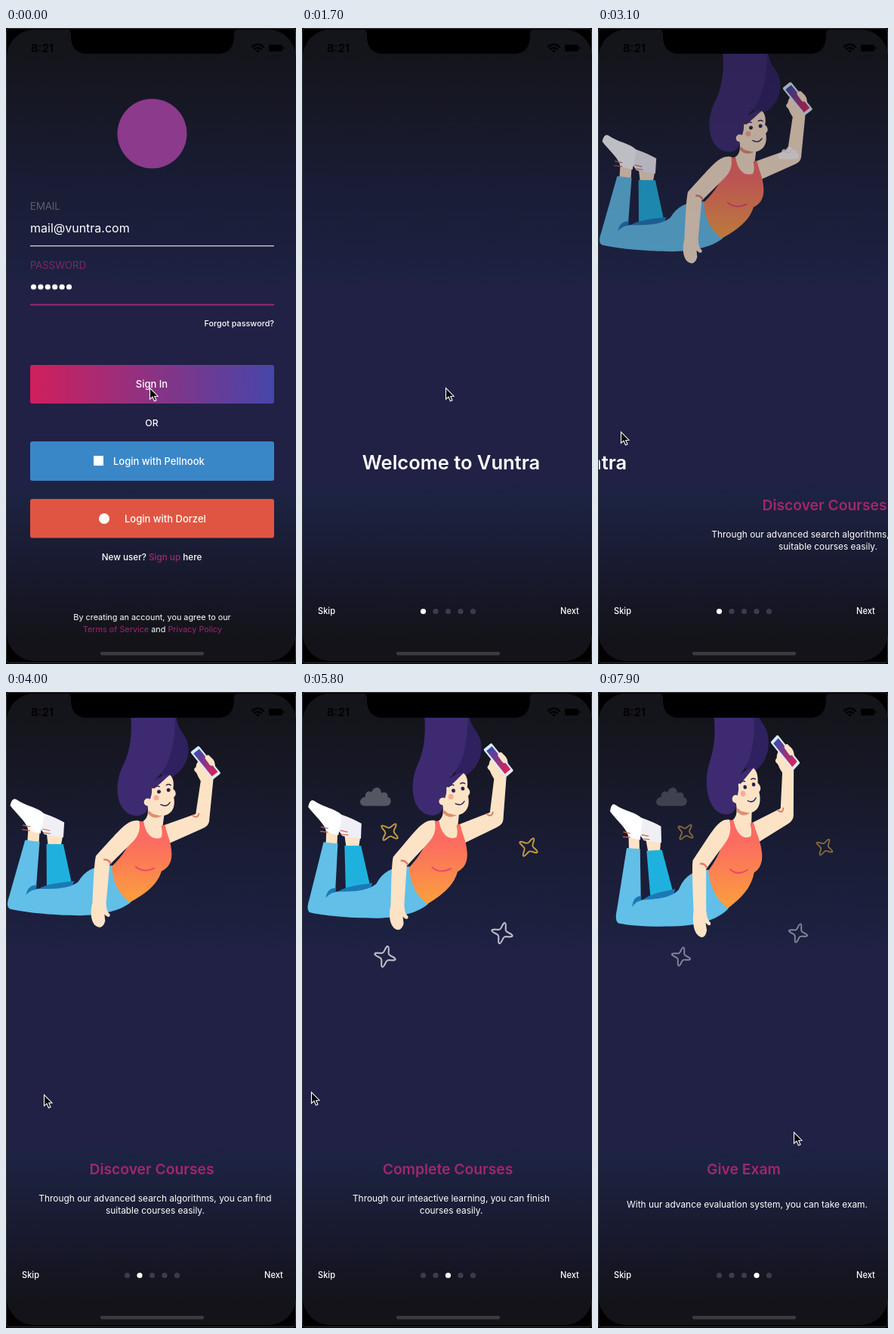
An HTML page for the animation above (8000 ms loop, 384 by 840 pixels).

```html
<!DOCTYPE html>
<html lang="en">
<head>
<meta charset="utf-8">
<title>Onboarding</title>
<style>
  html, body { margin: 0; width: 100%; height: 100%; overflow: hidden; background: #000; }
  svg { display: block; width: 384px; height: 840px; }
  text { font-family: Inter, "Open Sans", sans-serif; fill: #fff; white-space: pre; }
  .mid { text-anchor: middle; }
  .btn { font-size: 13px; font-weight: 500; }
  .label { font-size: 13.3px; font-weight: 300; }
  .small { font-size: 10.85px; }
  .nav { font-size: 11.1px; font-weight: 500; }
  .title { font-size: 19.3px; font-weight: 600; fill: #a0286f; }
  .desc { font-size: 11.9px; }
  .pink { fill: #a0286f; }
  .skin { fill: #fde3c6; }
  .line { fill: none; stroke-linecap: round; stroke-linejoin: round; }
</style>
</head>
<body>
<svg viewBox="0 0 384 840">
  <defs>
    <linearGradient id="bg" gradientUnits="userSpaceOnUse" x1="0" y1="0" x2="0" y2="840">
      <stop offset=".04" stop-color="#14141b"/>
      <stop offset=".13" stop-color="#171826"/>
      <stop offset=".24" stop-color="#191c34"/>
      <stop offset=".385" stop-color="#1d2141"/>
      <stop offset=".41" stop-color="#212145"/>
      <stop offset=".71" stop-color="#202145"/>
      <stop offset=".74" stop-color="#1c2341"/>
      <stop offset=".86" stop-color="#18192d"/>
      <stop offset=".96" stop-color="#131319"/>
    </linearGradient>
    <linearGradient id="sign">
      <stop offset="0" stop-color="#d01f5c"/>
      <stop offset="1" stop-color="#4646aa"/>
    </linearGradient>
    <linearGradient id="edge">
      <stop offset="0" stop-color="#000" stop-opacity="0"/>
      <stop offset="1" stop-color="#000" stop-opacity=".25"/>
    </linearGradient>
    <linearGradient id="top" x2="0" y2="1">
      <stop offset=".25" stop-color="#fc6b61"/>
      <stop offset="1" stop-color="#fba03c"/>
    </linearGradient>
    <linearGradient id="glass" x2="0" y2="1">
      <stop offset="0" stop-color="#3f47ab"/>
      <stop offset="1" stop-color="#dc2257"/>
    </linearGradient>
    <clipPath id="screen"><rect x="1" y="2" width="383" height="834" rx="37"/></clipPath>
    <path id="cloud" d="M-14 12 C-23 11 -21 1 -13 0 C-14 -7 -8 -9 -5 -6 C-2 -15 8 -14 8 -5 C14 -8 18 -3 16 0 C23 1 22 12 14 12Z"/>
    <path id="star" class="line" d="M0-12.500 C2.500-12.500 2-4.500 3.800-3.800 C4.500-2 12.500-2.500 12.500 0 C12.500 2.500 4.500 2 3.800 3.800 C2 4.500 2.500 12.500 0 12.500 C-2.500 12.500 -2 4.500 -3.800 3.800 C-4.500 2 -12.500 2.500 -12.500 0 C-12.500-2.500 -4.500-2 -3.800-3.800 C-2-4.500 -2.500-12.500 0-12.500Z"/>
  </defs>

  <rect width="384" height="840"/>
  <rect x=".5" y=".5" width="383" height="838" rx="4" fill="none" stroke="#333"/>

  <g clip-path="url(#screen)">
    <rect width="384" height="840" fill="url(#bg)"/>

    <g id="login">
      <circle cx="193.5" cy="139.5" r="46" fill="#8c3a8c"/>
      <text class="label" x="32" y="240" style="fill:#707078">EMAIL</text>
      <text x="32" y="270" font-size="16">mail@vuntra.com</text>
      <rect x="32" y="287" width="323" height="1.5" fill="#b9b9c6"/>
      <text class="label" id="passLabel" x="32" y="318">PASSWORD</text>
      <g id="pass" fill="#fff"></g>
      <rect id="passLine" x="32" width="323"/>
      <text class="nav" x="355" y="394" text-anchor="end" style="font-size:10.8px">Forgot password?</text>
      <rect x="32" y="445" width="323" height="51" rx="3" fill="url(#sign)"/>
      <text class="btn mid" x="193" y="475">Sign In</text>
      <text class="btn mid" x="193" y="525.5" style="font-size:12.3px">OR</text>
      <rect x="32" y="546" width="323" height="52" rx="3" fill="#3a87c7"/>
      <rect x="116" y="565" width="13" height="13" fill="#fff"/>
      <text class="btn" x="142" y="577">Login with Pellnook</text>
      <rect x="32" y="622" width="323" height="51.500" rx="3" fill="#e05541"/>
      <circle cx="130" cy="648" r="7" fill="#fff"/>
      <text class="btn" x="157" y="653">Login with Dorzel</text>
      <text class="mid" x="193" y="703" font-size="11.7" font-weight="500">New user? <tspan class="pink">Sign up</tspan> here</text>
      <text class="small mid" x="193.500" y="782">By creating an account, you agree to our</text>
      <text class="small mid" x="194" y="798"><tspan class="pink">Terms of Service</tspan> and <tspan class="pink">Privacy Policy</tspan></text>
    </g>

    <g id="intro">
      <rect x="-10" width="10" height="840" fill="url(#edge)"/>
      <rect width="385" height="840" fill="url(#bg)"/>

      <g id="art">
        <g id="sky">
          <use href="#cloud" x="97" y="138.500" fill="#fff" opacity=".32"/>
          <g id="stars" stroke-width="1.9"></g>
        </g>
        <use id="lowCloud" href="#cloud" x="20" y="162" fill="#fff"/>

        <g id="girl">
          <!-- hair -->
          <path fill="#2f2160" d="M200 20 L222 20 C223 46 232 50 237 61 C245 82 234 110 205 116Z"/>
          <path fill="#3d2a70" d="M162 16 C168 62 161 82 152 101 C143 124 146 152 163 161 C176 167 189 161 188 146 L197 114 C216 98 224 62 221 16Z"/>
          <!-- back leg and shoes -->
          <path class="skin" d="M31 181 L46 184 L45 201 L30 199Z M55 187 L76 192 L74 204 L57 203Z"/>
          <path fill="#f1eff6" d="M22 153 C44 158 62 164 78 173 L77 193 L52 189 C46 178 34 170 22 153Z"/>
          <path fill="#fff" d="M7 151 C8 145 11 140 15 143 C28 152 43 153 52 162 L47 188 L31 184 C29 173 17 164 7 151Z"/>
          <path class="line" stroke="#c8694c" stroke-width="1.200" d="M24 177 l9 2 M23 183 l10 1 M50 182 l9 2 M51 187 l9 1"/>
          <path fill="#1fb1de" d="M55 202 L77 202 L89 256 L56 260Z"/>
          <path fill="#1b79b6" d="M36 270 C48 254 75 254 92 251 L88 262Z"/>
          <!-- trousers -->
          <path fill="#62bfe8" d="M27 197 L46 199 L42 262 C65 262 85 262 97 252 C106 236 120 229 142 230 L166 279 C150 292 125 296 100 297 C60 297 25 293 8 289 C3 286 5 278 7 272Z"/>
          <path fill="#1b79b6" d="M29 270 C31 259 37 257 43 257 L42 263 C37 263 33 266 29 270Z"/>
          <!-- raised arm, neck, chest -->
          <path class="skin" d="M187 150 L209 159 L207 176 L250 160 L256 116 C244 98 250 88 262 83 C272 82 278 92 273 108 L268 166 C268 175 264 177 258 180 L215 200 L182 205 L172 174 C184 171 189 166 187 150Z"/>
          <path class="line" stroke="#e08e70" stroke-width="4" d="M189 159 Q195 166 204 162"/>
          <path class="line" stroke="#df7c68" stroke-width="2" d="M246 162 Q252 167 254 160"/>
          <path fill="url(#top)" d="M175 170 L182 171 C184 186 193 197 205 192 C207 186 206 181 205 176 L210 175 C213 190 218 196 219 212 C220 228 212 234 206 237 C200 258 180 270 165 279 C150 268 142 252 141 231 C150 222 160 210 165 195Z"/>
          <path class="line" stroke="#ee4869" stroke-width="2" d="M172 231 Q182 240 197 233"/>
          <!-- face -->
          <path class="skin" d="M186 146 C189 124 200 112 215 108 C221 112 221 121 220 127 C225 131 224 136 221 138 C224 152 218 162 206 163 C196 163 188 156 186 146Z"/>
          <path fill="#3d2a70" d="M184 142 C186 120 198 110 217 107 C208 114 201 124 192 127 C193 135 190 141 188 145Z"/>
          <circle class="skin" cx="187" cy="145" r="5"/>
          <circle cx="201.500" cy="131" r="2.500" fill="#2b1f50"/>
          <circle cx="214" cy="128.500" r="2.500" fill="#2b1f50"/>
          <circle cx="198" cy="139" r="3.500" fill="#f9ab92"/>
          <path class="line" stroke="#2b1f50" stroke-width="1.400" d="M195 126 q4-4 7-2 M211 122 q3-2 6 0 M204 148 Q212 152 216 145"/>
          <!-- phone and fingers -->
          <g transform="translate(262.500 92) rotate(-39)">
            <rect x="-7" y="-24" width="14" height="47" rx="2" fill="#d5ecf6"/>
            <rect x="-4.800" y="-20" width="9.600" height="39" fill="url(#glass)"/>
          </g>
          <path class="line" stroke="#fde3c6" stroke-width="7" d="M265 85 L270 92 M251 101 L258 108"/>
          <!-- near arm -->
          <path class="skin" d="M176 170 C160 167 150 184 120 217 C118 223 117 250 116 280 C113 292 114 304 120 310 C126 315 131 312 133 304 L132 295 C136 300 140 299 139 295 C134 290 135 286 134 280 L138 229 L167 199 C176 190 178 181 176 170Z"/>
          <path class="line" stroke="#df7c68" stroke-width="2.500" d="M131 222 Q137 222 139 227"/>
        </g>
        <use id="armCloud" href="#cloud" fill="#fff" transform="translate(252 165) scale(.68)"/>
      </g>

      <g id="pages"></g>
      <text class="nav" x="21" y="774">Skip</text>
      <text class="nav" x="342" y="774">Next</text>
      <g id="dots"></g>
    </g>

    <!-- device -->
    <path d="M78 0 C86 1 86 5 86 12 C87 28 95 34 108 34 H280 C293 34 301 28 302 12 C302 5 302 1 310 0Z"/>
    <text x="33" y="32" font-size="15" font-weight="600" style="fill:#000">8:21</text>
    <path class="line" stroke="#000" stroke-width="2.300" d="M326 25 Q333.500 18 341 25 M329 28 Q333.500 24 338 28"/>
    <circle cx="333.500" cy="30.500" r="1.700"/>
    <rect x="348" y="22" width="18" height="9" rx="2.500"/>
    <rect x="367" y="25" width="1.500" height="3"/>
    <rect x="125" y="824" width="137" height="4.500" rx="2.200" fill="#3b3b3f"/>
  </g>

  <path id="cursor" fill="#000" stroke="#fff" stroke-width="1.100" d="M.5 .7 V15.200 L4 12.200 L6.500 17.700 L9 16.700 L6.700 11.400 L11 11.200Z"/>
</svg>

<script>
const LOOP = 8000, WIDTH = 384, PINK = '#a0286f';
const $ = id => document.getElementById(id);
const clamp = v => Math.max(0, Math.min(1, v));
const smooth = u => u * u * (3 - 2 * u);
const linear = u => u;

function add(parent, tag, attrs, text = '') {
  const el = document.createElementNS('http://www.w3.org/2000/svg', tag);
  for (const k in attrs) el.setAttribute(k, attrs[k]);
  el.textContent = text;
  parent.append(el);
  return el;
}

// keys: [time, value, ...]
function track(keys, t, ease = linear) {
  let i = 0;
  while (i < keys.length - 1 && keys[i + 1][0] <= t) i++;
  const a = keys[i], b = keys[i + 1];
  if (!b || t < a[0]) return a.slice(1);
  const u = ease((t - a[0]) / (b[0] - a[0]));
  return a.slice(1).map((v, k) => v + (b[k + 1] - v) * u);
}

const CURSOR = [
  [0, 190, 475], [1900, 190, 475], [2600, 340, 528], [2750, 320, 530],
  [3100, 30, 533], [3800, 30, 533], [4700, 187, 521], [4980, 187, 521],
  [5200, 39, 525], [5400, 12, 528], [5900, 12, 528], [6600, 140, 557],
  [6740, 140, 557], [6800, 130, 558], [7000, 20, 562], [7250, 6, 564],
  [7900, 259, 581], [8000, 260, 581]
];
const SCROLL = [
  [0, 0], [2750, 0], [3100, .72], [3250, .92], [3420, 1], [5000, 1],
  [5200, 1.38], [5320, 1.8], [5450, 2], [6760, 2], [6800, 2.025],
  [7000, 2.4], [7130, 2.8], [7300, 3]
];
// opacity, scale
const STARS = [
  [0, 0, 1.6], [4700, 0, 1.6], [5200, .35, 1.5], [6000, 1, 1],
  [7000, 1, 1], [7900, .55, 1], [8000, .5, 1]
];
const LOW_CLOUD = [[0, 0], [4900, 0], [5200, .2], [5700, 0]];
const ARM_CLOUD = [[0, 0], [2750, 0], [3100, .8], [3500, 0]];

const PAGES = [
  ['Discover Courses', 'Through our advanced search algorithms, you can find', 'suitable courses easily.'],
  ['Complete Courses', 'Through our inteactive learning, you can finish', 'courses easily.'],
  ['Give Exam', 'With uur advance evaluation system, you can take exam.']
];

const welcome = add($('pages'), 'text',
  { class: 'mid', y: 583, 'font-size': 25.5, 'font-weight': 600 }, 'Welcome to Vuntra');
const pages = PAGES.map(([title, ...lines]) => ({
  title: add($('pages'), 'text', { class: 'title mid', y: 637 }, title),
  lines: lines.map((s, i) => add($('pages'), 'text',
    { class: 'desc mid', y: lines.length > 1 ? 673 + 16 * i : 681 }, s))
}));
const dots = [0, 1, 2, 3, 4].map(i =>
  add($('dots'), 'circle', { cx: 160.5 + 16.5 * i, cy: 770.5, r: 3.6 }));
for (let i = 0; i < 6; i++) add($('pass'), 'circle', { cx: 36.5 + 9.4 * i, cy: 342, r: 3.6 });

// x, y, turn, size, colour
const stars = [
  [116, 185, 38, .95, '#e6b34a'], [300, 205, 30, .95, '#e6b34a'],
  [265, 318.5, 15, 1, '#dcdce6'], [110, 349.5, 15, 1, '#dcdce6']
].map(([x, y, turn, size, stroke]) => ({
  x, y, turn, size, el: add($('stars'), 'use', { href: '#star', stroke, fill: 'none' })
}));

const move = (el, x, y = 0) => el.setAttribute('transform', `translate(${x} ${y})`);
const fade = (el, o) => el.setAttribute('opacity', o);
const show = (el, on) => { el.style.display = on ? '' : 'none'; };

function drawLogin(t) {
  const focus = t < 300, push = smooth(clamp((t - 620) / 540));
  $('passLabel').style.fill = focus ? PINK : '#707078';
  const line = $('passLine');
  line.setAttribute('fill', focus ? PINK : '#b9b9c6');
  line.setAttribute('y', focus ? 364.5 : 365);
  line.setAttribute('height', focus ? 2 : 1.5);
  move($('login'), -WIDTH * .3 * push);
  move($('intro'), (WIDTH + 1) * (1 - push));
  show($('login'), push < 1);
  show($('intro'), push > 0);
}

function drawArt(t, scroll) {
  fade($('art'), clamp(scroll));
  const s = -.16 + .062 * (t / 1000 - 3.6) ** 2;
  const pose = [1 - .075 * s, -.058 * s, .075 * s, 1 + .07 * s, -1.6 * s, -3 * s];
  $('girl').setAttribute('transform', `matrix(${pose})`);
  const [glow, grow] = track(STARS, t);
  fade($('sky'), glow);
  for (const { el, x, y, turn, size } of stars)
    el.setAttribute('transform', `translate(${x} ${y}) rotate(${turn}) scale(${size * grow})`);
  fade($('lowCloud'), track(LOW_CLOUD, t)[0]);
  fade($('armCloud'), track(ARM_CLOUD, t)[0]);
}

function drawPages(scroll) {
  welcome.setAttribute('x', 197.5 - WIDTH * scroll);
  pages.forEach(({ title, lines }, i) => {
    const gap = i + 1 - scroll, slidesIn = i === 0 && gap > 0;
    title.setAttribute('x', 193 + (slidesIn ? WIDTH * gap : 0));
    fade(title, slidesIn ? 1 : clamp(1 - 2 * Math.abs(gap)));
    for (const el of lines) el.setAttribute('x', 197.5 + WIDTH * gap);
  });
  const active = Math.floor(scroll + 1e-6);
  dots.forEach((d, i) => d.setAttribute('fill', i === active ? '#fff' : '#3c3c4d'));
}

function render(t) {
  const [scroll] = track(SCROLL, t);
  drawLogin(t);
  drawArt(t, scroll);
  drawPages(scroll);
  move($('cursor'), ...track(CURSOR, t, smooth));
}

const start = performance.now();
function tick() {
  render((performance.now() - start) % LOOP);
  requestAnimationFrame(tick);
}
tick();
</script>
</body>
</html>
```
